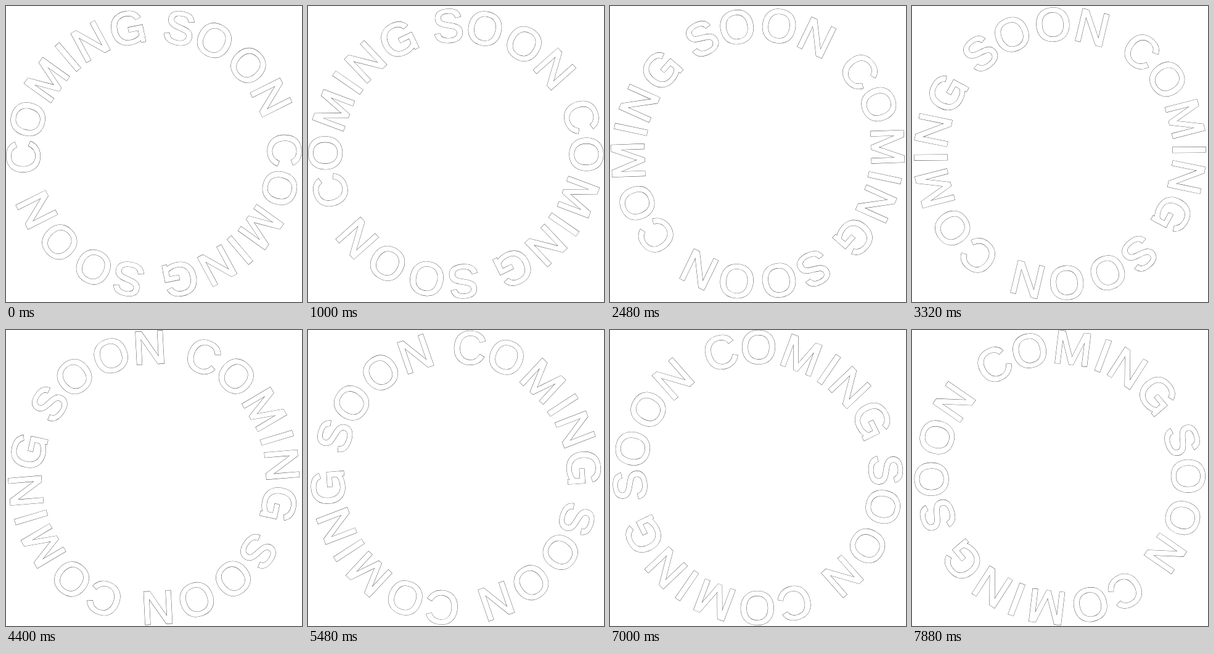
Recreate the animation shown at these times as an HTML page. Size 480x480 px, loop 8 s.

```html
<!DOCTYPE html>
<html lang="en">
<head>
<meta charset="utf-8">
<title>Coming soon</title>
<style>
  html, body { margin: 0; width: 100%; height: 100%; overflow: hidden; background: #fff; }
  svg { display: block; width: 100%; height: 100%; }
  text { font: 75px "Liberation Sans", Arial, sans-serif; text-anchor: middle; }
  .edge { fill: #222; stroke: #222; stroke-width: 2.75; }
  .face { fill: #fff; stroke: #fff; stroke-width: 2.1; }
</style>
</head>
<body>
<svg viewBox="0 0 480 480"><g id="ring"></g></svg>
<script>
const LOOP = 8000;
const TICK = 40;          // display clock in ms
const STEP = 1.25;        // degrees per drawn step, 12 steps a second
const CENTER = [239.8, 239.4];
const HALF_CAP = 25.8;

// Letter and its angle along the ring, in degrees
const LETTERS = [
  ["C", 178.4], ["O", 195.3], ["M", 214.5], ["I", 228.3], ["N", 240.5], ["G", 258.2],
  ["S", 281.5], ["O", 298.1], ["O", 316.9], ["N", 334.4]
];

const ring = document.getElementById("ring");
const rad = deg => deg * Math.PI / 180;

function add(parent, tag, attrs) {
  const el = document.createElementNS("http://www.w3.org/2000/svg", tag);
  for (const key in attrs) el.setAttribute(key, attrs[key]);
  return parent.appendChild(el);
}

// The ring is slightly oval, so radius and tilt vary with the angle
function place(angle) {
  const phase = rad(2 * (angle - 183));
  const r = 209.6 + 2.2 * Math.cos(phase);
  const tilt = angle + 90 + 1.2 * Math.sin(phase);
  const x = r * Math.cos(rad(angle));
  const y = r * Math.sin(rad(angle));
  return `translate(${x.toFixed(2)} ${y.toFixed(2)}) rotate(${tilt.toFixed(2)})`;
}

function drawLayer(name) {
  const layer = add(ring, "g", { class: name });
  for (const turn of [0, 180]) {
    for (const [char, angle] of LETTERS) {
      const glyph = add(layer, "g", { transform: place(angle + turn) });
      add(glyph, "text", { y: HALF_CAP }).textContent = char;
      // spur at the foot of the G
      if (char === "G") add(glyph, "path", { d: `M18.1 ${HALF_CAP}v-10h5.5v10z` });
    }
  }
}

function update(time) {
  const tick = Math.floor((time % LOOP) / TICK);
  const step = Math.ceil((tick + 1) * 12 / 25) - 1;
  ring.setAttribute("transform", `translate(${CENTER}) rotate(${-STEP * step})`);
}

drawLayer("edge");
drawLayer("face");
update(0);

let start;
function frame(now) {
  start ??= now;
  update(now - start);
  requestAnimationFrame(frame);
}
requestAnimationFrame(frame);
</script>
</body>
</html>
```
